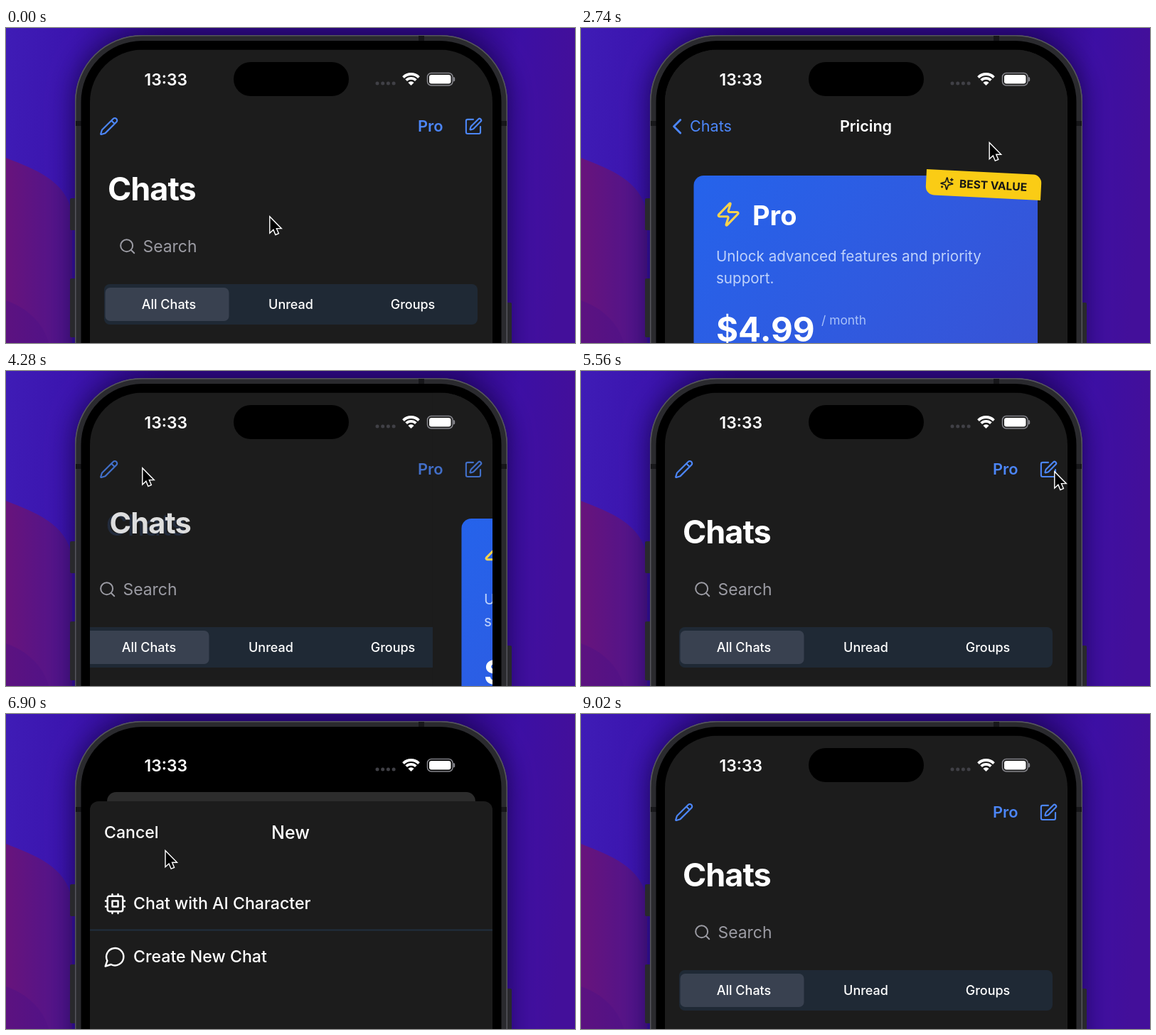
An HTML page with a canvas that plays this animation: 800 px wide and 444 px high, repeating every 9.04 s.

```html
<!DOCTYPE html>
<html lang="en">
<head>
<meta charset="utf-8">
<style>
html, body { margin: 0; width: 100%; height: 100%; overflow: hidden; background: #3a12ae; }
canvas { display: block; width: 800px; height: 444px; }
</style>
</head>
<body>
<canvas id="stage"></canvas>
<script>
const LOOP = 9040, SCREEN = { x: 118, y: 30.5, w: 566 };
const BLUE = '#4c86f8', PAGE = '#1c1c1c';
const canvas = document.getElementById('stage');
const ctx = canvas.getContext('2d');
const ratio = window.devicePixelRatio || 1;
canvas.width = 800 * ratio;
canvas.height = 444 * ratio;

const icons = {
  pencil: 'M21.174 6.812a1 1 0 0 0-3.986-3.987L3.842 16.174a2 2 0 0 0-.5.83l-1.321 4.352a.5.5 0 0 0 .623.622l4.353-1.32a2 2 0 0 0 .83-.497zM15 5l4 4',
  compose: 'M12 3H5a2 2 0 0 0-2 2v14a2 2 0 0 0 2 2h14a2 2 0 0 0 2-2v-7M18.375 2.625a1 1 0 0 1 3 3l-9.013 9.014a2 2 0 0 1-.853.505l-2.873.84a.5.5 0 0 1-.62-.62l.84-2.873a2 2 0 0 1 .506-.852z',
  search: 'M19 11a8 8 0 1 1-16 0a8 8 0 1 1 16 0M21 21l-4.3-4.3',
  zap: 'M4 14a1 1 0 0 1-.78-1.63l9.9-10.2a.5.5 0 0 1 .86.46l-1.92 6.02A1 1 0 0 0 13 10h7a1 1 0 0 1 .78 1.63l-9.9 10.2a.5.5 0 0 1-.86-.46l1.92-6.02A1 1 0 0 0 11 14z',
  sparkles: 'M9.9 15.5A2 2 0 0 0 8.5 14.1L2.4 12.5a.5.5 0 0 1 0-1L8.5 9.9A2 2 0 0 0 9.9 8.5L11.5 2.4a.5.5 0 0 1 1 0L14.1 8.5A2 2 0 0 0 15.5 9.9L21.6 11.5a.5.5 0 0 1 0 1L15.5 14.1A2 2 0 0 0 14.1 15.5L12.5 21.6a.5.5 0 0 1-1 0zM20 3v4M22 5h-4M4 17v2M5 18H3',
  cpu: 'M6 4h12a2 2 0 0 1 2 2v12a2 2 0 0 1-2 2H6a2 2 0 0 1-2-2V6a2 2 0 0 1 2-2zM9 9h6v6H9zM15 2v2M15 20v2M2 15h2M2 9h2M20 15h2M20 9h2M9 2v2M9 20v2',
  message: 'M7.9 20A9 9 0 1 0 4 16.1L2 22Z',
  chevron: 'M15 4l-8 8 8 8'
};
for (const name in icons) icons[name] = new Path2D(icons[name]);

const blobs = [
  ['M0 183C42 200 84 214 93 262V444H0Z', '#68147c', '#4b148e'],
  ['M0 384C30 394 54 418 60 444H0Z', '#5c1280', '#4c128a']
].map(([d, from, to]) => [new Path2D(d), from, to]);
const arrow = new Path2D('M0 0V24L5.6 18.8L9.4 27.8L13.2 26.2L9.4 17.4H17Z');

// [start, end, from, control, to]
const moves = [
  [100, 1400, [371, 266], [500, 215], [596, 139]],
  [2480, 3480, [596, 139], [560, 220], [192, 137]],
  [4500, 5440, [192, 137], [430, 195], [666, 142]],
  [6100, 7100, [666, 142], [400, 303], [178, 168]]
];
const clicks = [1540, 3860, 5580, 7420];

const clamp = v => Math.min(1, Math.max(0, v));
const lerp = (a, b, k) => a + (b - a) * k;
const smooth = u => u * u * (3 - 2 * u);

function spring(t, start) {
  const s = Math.max(0, t - start) * 0.0183;
  return 1 - (1 + s) * Math.exp(-s);
}

function box(x, y, w, h, r, fill) {
  ctx.beginPath();
  ctx.roundRect(x, y, w, h, r);
  if (fill) { ctx.fillStyle = fill; ctx.fill(); }
}

function text(str, x, y, size, weight, color, align = 'left', spacing = 0) {
  ctx.font = `${weight} ${size}px Inter, sans-serif`;
  ctx.letterSpacing = spacing + 'px';
  ctx.textAlign = align;
  ctx.fillStyle = color;
  ctx.fillText(str, x, y);
}

function icon(name, x, y, scale, color, width = 2) {
  ctx.save();
  ctx.translate(x, y);
  ctx.scale(scale, scale);
  ctx.lineCap = ctx.lineJoin = 'round';
  ctx.lineWidth = width;
  ctx.strokeStyle = color;
  ctx.stroke(icons[name]);
  ctx.restore();
}

function gradient(x0, y0, x1, y1, ...stops) {
  const g = ctx.createLinearGradient(x0, y0, x1, y1);
  stops.forEach(([at, color]) => g.addColorStop(at, color));
  return g;
}

function layer(alpha, draw) {
  if (alpha < 0.002) return;
  ctx.save();
  ctx.globalAlpha *= clamp(alpha);
  draw();
  ctx.restore();
}

function drawBackground() {
  ctx.fillStyle = gradient(0, 0, 800, 60, [0, '#3f1cb6'], [0.12, '#3b14ae'], [0.28, '#30098a'],
    [0.8, '#30098a'], [0.9, '#3c0fa4'], [1, '#430f9a']);
  ctx.fillRect(0, 0, 800, 444);
  for (const [path, from, to] of blobs) {
    ctx.fillStyle = gradient(0, 0, 95, 0, [0, from], [1, to]);
    ctx.fill(path);
  }
}

function drawPhone() {
  ctx.save();
  ctx.shadowColor = 'rgba(12,0,48,0.7)';
  ctx.shadowBlur = 36 * ratio;
  box(97, 10, 608, 600, 94, '#55555c');
  ctx.restore();
  box(90, 240, 10, 45, 2, '#29292d');
  box(90, 353, 10, 83, 2, '#29292d');
  box(702, 387, 9, 80, 2, '#29292d');
  box(97, 10, 608, 600, 94, '#55555c');
  box(98.5, 11.5, 605, 600, 92.5, '#2a2a2e');
  ctx.fillStyle = '#17171a';
  ctx.fillRect(98, 131, 9, 7);
  ctx.fillRect(696, 131, 8, 7);
  ctx.fillRect(580, 11, 8, 8);
  box(105.5, 18, 591, 600, 86, '#000');
}

function drawStatusBar() {
  text('13:33', 194.5, 81, 22.8, 600, '#fff');
  box(320, 48, 162, 48, 24, '#000');
  for (let i = 0; i < 4; i++) box(519.5 + i * 7.7, 75.5, 5, 5, 2.5, '#404046');

  ctx.strokeStyle = ctx.fillStyle = '#fff';
  ctx.lineWidth = 3.8;
  ctx.lineCap = 'butt';
  for (const r of [15.5, 9.7]) {
    ctx.beginPath();
    ctx.arc(569.5, 80.5, r, -Math.PI * 0.75, -Math.PI * 0.25);
    ctx.stroke();
  }
  ctx.beginPath();
  ctx.moveTo(569.5, 81);
  ctx.arc(569.5, 81, 5.8, -Math.PI * 0.75, -Math.PI * 0.25);
  ctx.fill();

  box(592.5, 63.5, 35.5, 17.5, 5.5);
  ctx.lineWidth = 1.5;
  ctx.strokeStyle = '#85858b';
  ctx.stroke();
  box(595, 66, 30.5, 12.5, 3.2, '#fff');
  box(629, 69, 2.2, 6.5, [0, 2, 2, 0], '#85858b');
}

function drawChatList() {
  icon('search', 158, 295, 1.06, '#9c9ca4', 1.9);
  text('Search', 192.5, 316, 22.9, 400, '#9c9ca4');
  box(138, 361, 525, 57, 8, '#1f2935');
  box(139.5, 366, 174, 47, 7, '#394150');
  text('All Chats', 229, 396, 18, 500, '#fff', 'center');
  text('Unread', 400.5, 396, 18, 500, '#fff', 'center');
  text('Groups', 572, 396, 18, 500, '#fff', 'center');
}

function drawPricing() {
  ctx.fillStyle = PAGE;
  ctx.fillRect(SCREEN.x, SCREEN.y, SCREEN.w, 420);
  box(158.5, 208, 483.5, 400, 14, gradient(159, 208, 642, 608, [0, '#2563eb'], [1, '#3c50d2']));
  icon('zap', 188.5, 244, 1.55, '#fcd34d');
  text('Pro', 241, 277.5, 38, 700, '#fff');
  text('Unlock advanced features and priority', 190, 329, 20.6, 400, '#bfd2fb');
  text('support.', 190, 360, 20.6, 400, '#bfd2fb');
  text('$4.99', 190, 442, 47.5, 700, '#fff');
  text('/ month', 338, 418, 17.4, 400, '#a9c2f9');

  ctx.save();
  ctx.translate(566, 221);
  ctx.rotate(0.05);
  box(-81, -18, 162, 36, [0, 12, 0, 12], '#facc15');
  icon('sparkles', -61.5, -9, 0.82, '#1a1a1a');
  text('BEST VALUE', -34, 5.8, 15.5, 700, '#151515');
  ctx.restore();
}

// push: 0 shows the chat list, 1 shows pricing
function drawApp(push) {
  ctx.save();
  ctx.translate(-push * SCREEN.w / 3, 0);
  drawChatList();
  ctx.restore();

  layer(push > 0.001 ? 1 : 0, () => {
    ctx.translate(SCREEN.w * (1 - push), 0);
    drawPricing();
  });

  layer((1 - push) ** 1.5, () => {
    icon('pencil', 130.9, 124.7, 1.15, BLUE, 1.9);
    text('Pro', 579, 146, 21.8, 600, BLUE);
    icon('compose', 643.5, 125.5, 1.12, BLUE, 1.9);
  });

  // The large title and the back label morph into each other
  const y = lerp(243, 146, push), size = lerp(45, 21.6, push);
  layer(push, () => text('Chats', lerp(138, 153, push), y + 4 * (1 - push), size, 400, BLUE));
  layer(1 - push, () => text('Chats', lerp(143, 160, push), y, size, 700, '#fff', 'left', -size * 0.022));
  layer(push ** 4, () => {
    icon('chevron', 122.5, 125, 1.15, BLUE, 2.5);
    text('Pricing', lerp(600, 400.5, push), 146, 21.6, 600, '#fff', 'center');
  });
}

function drawSheet(open) {
  ctx.save();
  ctx.translate(0, (1 - open) * 330);
  box(SCREEN.x, 123, SCREEN.w, 500, 12, PAGE);
  text('Cancel', 138, 175, 23.1, 500, '#fff');
  text('New', 400, 175.5, 25, 500, '#fff', 'center');
  icon('cpu', 137.3, 251.3, 1.35, '#fff', 1.8);
  text('Chat with AI Character', 179, 275, 23.15, 500, '#fff');
  ctx.fillStyle = '#202f3f';
  ctx.fillRect(SCREEN.x, 303.5, SCREEN.w, 2);
  icon('message', 137, 326, 1.35, '#fff', 1.8);
  text('Create New Chat', 179, 350, 23.15, 500, '#fff');
  ctx.restore();
}

function drawScreen(t) {
  const push = spring(t, 1860) - spring(t, 4096);
  const sheet = spring(t, 5800) - spring(t, 7660);
  ctx.save();
  box(SCREEN.x, SCREEN.y, SCREEN.w, 600, 74);
  ctx.clip();

  ctx.save();
  const scale = 1 - 0.085 * sheet, shade = Math.round(lerp(28, 44, sheet));
  ctx.translate(401, lerp(SCREEN.y, 110, sheet));
  ctx.scale(scale, scale);
  ctx.translate(-401, -SCREEN.y);
  box(SCREEN.x, SCREEN.y, SCREEN.w, 600, 14 * clamp(sheet * 4), `rgb(${shade},${shade},${shade})`);
  ctx.clip();
  drawApp(push);
  ctx.restore();

  if (sheet > 0.001) drawSheet(sheet);
  drawStatusBar();
  ctx.restore();
}

function cursorAt(t) {
  let point = moves[0][2];
  for (const [start, end, a, c, b] of moves) {
    if (t < start) break;
    const e = smooth(clamp((t - start) / (end - start)));
    point = [0, 1].map(i => (1 - e) ** 2 * a[i] + 2 * e * (1 - e) * c[i] + e * e * b[i]);
  }
  return point;
}

function drawCursor(t) {
  const [x, y] = cursorAt(t);
  for (const start of clicks) {
    const k = (t - start) / 420;
    if (k < 0 || k >= 1) continue;
    const [cx, cy] = cursorAt(start);
    ctx.beginPath();
    ctx.arc(cx, cy + 2, 11 + 43 * k, 0, Math.PI * 2);
    ctx.lineWidth = 4.5;
    ctx.strokeStyle = `rgba(84,180,48,${0.95 * (1 - k)})`;
    ctx.stroke();
  }
  layer(1 - clamp((t - 8940) / 80), () => {
    ctx.translate(x + 0.5, y + 1.5);
    ctx.scale(0.83, 0.83);
    ctx.lineJoin = 'miter';
    ctx.lineWidth = 3.4;
    ctx.strokeStyle = '#fff';
    ctx.stroke(arrow);
    ctx.fillStyle = '#000';
    ctx.fill(arrow);
  });
}

function render(now) {
  const t = now % LOOP;
  ctx.setTransform(ratio, 0, 0, ratio, 0, 0);
  drawBackground();
  drawPhone();
  drawScreen(t);
  drawCursor(t);
  requestAnimationFrame(() => render(performance.now()));
}
render(0);
</script>
</body>
</html>
```
